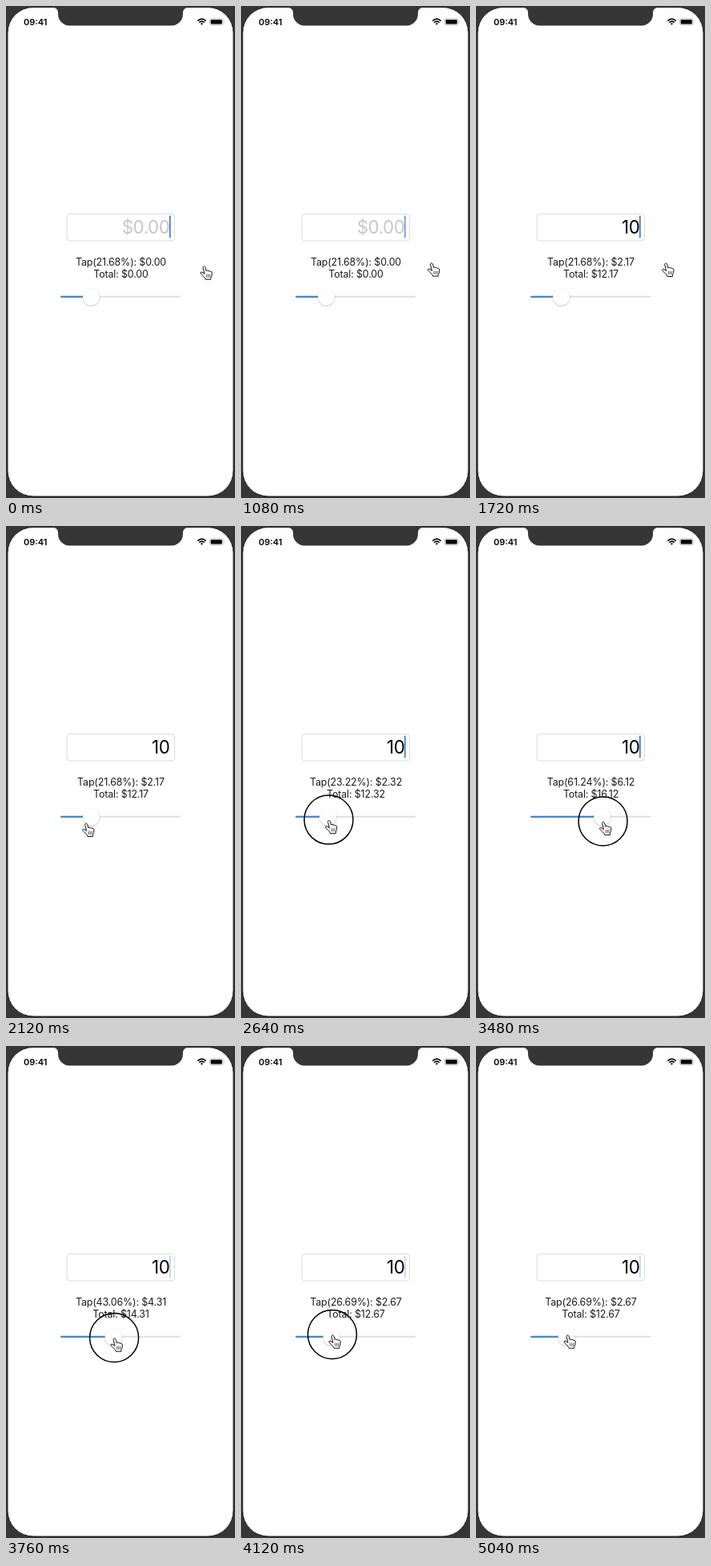
These frames come from a looping animation (286x614 px, 5080 ms). An HTML page:

```html
<!DOCTYPE html>
<html lang="en">
<head>
<meta charset="utf-8">
<title>Tip calculator</title>
<style>
  html, body { margin: 0; width: 100%; height: 100%; overflow: hidden; background: #363636; }
  svg { display: block; width: 286px; height: 614px; font-family: Inter, Roboto, sans-serif; }
  .label { font-size: 12.4px; letter-spacing: -.13px; text-anchor: middle; fill: #1a1a1a; }
  #amount { font-size: 22.4px; letter-spacing: -.5px; text-anchor: end; }
  #thumb { filter: drop-shadow(0 1.5px 1px rgba(0, 0, 0, .24)); }
</style>
</head>
<body>
<svg viewBox="0 0 286 614">
  <rect width="286" height="614" fill="#363636"/>
  <rect x="2" y="1.500" width="282" height="610.500" rx="32" fill="#fff" stroke="#1c1c1c"/>
  <path d="M59 0V2A6 6 0 0 1 65 8V10A14.500 14.500 0 0 0 79.500 24.500H206.500A14.500 14.500 0 0 0 221 10V8A6 6 0 0 1 227 2V0Z" fill="#363636"/>

  <text x="22" y="23.700" font-size="11" font-weight="600">09:41</text>
  <g fill="none" stroke="#000" stroke-width="1.700">
    <path d="M239.300 18.600Q244.500 13.800 249.700 18.600M241.200 20.700Q244.500 17.700 247.800 20.700"/>
    <path d="M242.800 21.800Q244.500 20.600 246.200 21.800L244.500 23.700Z" fill="#000" stroke="none"/>
  </g>
  <rect x="254.500" y="15.700" width="16.500" height="8" rx="2.200" fill="none" stroke="#aaa" stroke-width=".8"/>
  <rect x="255.700" y="16.900" width="14.100" height="5.600" rx="1.200"/>
  <path d="M272 18.300Q273.500 19.700 272 21.100Z" fill="#aaa"/>

  <rect x="76" y="259.500" width="134.500" height="33.500" rx="3.500" fill="#fff" stroke="#dcdcdc"/>
  <text id="amount" x="204.300" y="283.600"></text>
  <rect id="caret" x="203.900" y="261.500" width="1.800" height="28" rx=".8" fill="#4381cf"/>

  <text id="tip" class="label" x="143.500" y="323.600"></text>
  <text id="total" class="label" x="143.500" y="338.900"></text>

  <rect x="68" y="361.800" width="150" height="2" rx="1" fill="#dedede"/>
  <rect id="fill" x="68" y="361.700" height="2.200" rx="1.100" fill="#4389d4"/>
  <circle id="thumb" cy="363" r="10.500" fill="#fff"/>

  <g id="pointer">
    <circle id="press" r="30.500" fill="none" stroke="#000" stroke-width="1.500"/>
    <g transform="translate(-5 0)" stroke="#000" stroke-linejoin="round" stroke-linecap="round">
      <path fill="#fff" stroke-width=".95" d="M4 2.400C3.800 .5 6.400 .2 7 2.200L8.200 6.600C8.600 5.500 10.400 5.700 10.600 6.900C11.200 6 12.800 6.400 13 7.500C13.800 6.900 15.300 7.400 15.300 8.900L15 12C14.900 13.700 13.700 14.400 13.700 17.200H7.200C6.800 15 3.600 12.400 1.400 10.200C.2 8.800 1.600 7.400 3 8.300L5.600 10Z"/>
      <path fill="none" stroke-width=".65" d="M8.600 11V14.400M10.600 11V14.400M12.600 11V14.400"/>
    </g>
  </g>
</svg>
<script>
  const LOOP = 5080, STEP = 40;
  const BLINK = 920;
  const PX_PER_PERCENT = 1.29;
  const FIRST_KEY = 1120, SECOND_KEY = 1320;
  const PRESS = 2280, RELEASE = 4280;

  const el = id => document.getElementById(id);
  const clamp = v => Math.min(1, Math.max(0, v));

  // Progress of one hand movement: starts and stops softly
  function move(t, start, duration) {
    const u = clamp((t - start) / duration);
    return u ** 3 * (10 - 15 * u + 6 * u * u);
  }

  // Every key press holds the caret on and restarts its blinking
  function caretOpacity(t) {
    const lastKey = t < FIRST_KEY ? -390 : t < SECOND_KEY ? FIRST_KEY : SECOND_KEY;
    const elapsed = t - lastKey;
    if (elapsed < 300) return 1;
    const fromDark = Math.abs((elapsed + BLINK * .65) % BLINK - BLINK / 2);
    return clamp((fromDark - 140) / 120);
  }

  function draw(now) {
    const t = Math.floor(now % LOOP / STEP) * STEP;
    const drift = move(t, 440, 240);
    const reach = move(t, 1690, 350);
    const settle = move(t, 2040, 200);
    const dragRight = move(t, 2514.5, 730.8);
    const dragLeft = move(t, 3400, 696.1);

    const slide = 40 * dragRight - 34.99 * dragLeft;
    const percent = 21.68 + slide;
    const thumbX = 78.5 + PX_PER_PERCENT * percent;
    const pointerX = 247 - 9.5 * drift - 141.5 * reach + 11.5 * settle + PX_PER_PERCENT * slide;
    const pointerY = 324 - 4 * drift + 52 * reach - 5.5 * settle + 2 * dragRight - 8.5 * dragLeft;

    const amount = t < FIRST_KEY ? 0 : t < SECOND_KEY ? 1 : 10;
    const tip = amount * percent / 100;

    el('amount').textContent = amount || '$0.00';
    el('amount').setAttribute('fill', amount ? '#000' : '#c8c8cb');
    el('caret').setAttribute('opacity', caretOpacity(t));
    el('tip').textContent = `Tap(${percent.toFixed(2)}%): $${tip.toFixed(2)}`;
    el('total').textContent = `Total: $${(amount + tip).toFixed(2)}`;
    el('fill').setAttribute('width', thumbX - 68);
    el('thumb').setAttribute('cx', thumbX);
    el('pointer').setAttribute('transform', `translate(${pointerX} ${pointerY})`);
    el('press').setAttribute('visibility', t >= PRESS && t < RELEASE ? 'visible' : 'hidden');
  }

  function tick() {
    draw(performance.now());
    requestAnimationFrame(tick);
  }
  tick();
</script>
</body>
</html>
```
